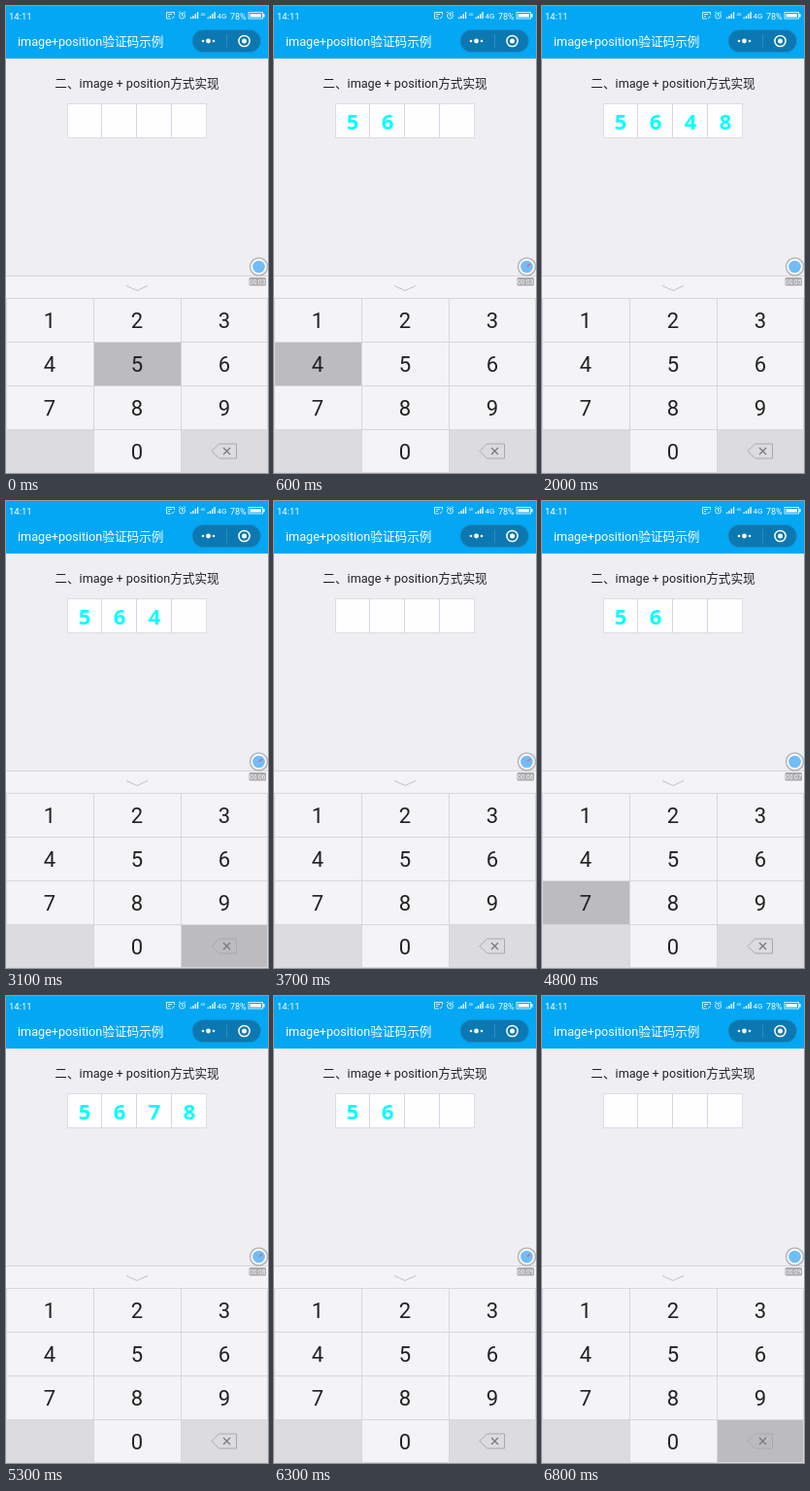
An HTML page for the animation above (7.2 s loop, 270 by 480 pixels).

```html
<!DOCTYPE html>
<html lang="zh-CN">
<head>
<meta charset="utf-8">
<style>
  html, body { margin: 0; width: 100%; height: 100%; overflow: hidden; background: #efeef3; }
  svg { display: block; width: 270px; height: 480px; }
  text { font-family: Roboto, "Noto Sans CJK SC", "Noto Sans CJK", sans-serif; }
  .mid { text-anchor: middle; }
  .line { fill: none; stroke: #d7d6da; }
  .white { fill: none; stroke: #fff; }
  .code { font: 700 22px "Open Sans", "Noto Sans", sans-serif; fill: #0ff; }
</style>
</head>
<body>
<svg viewBox="0 0 270 480">
  <rect width="270" height="480" fill="#efeef3"/>
  <rect width="270" height="54" fill="#03a7f3"/>

  <!-- status bar -->
  <g fill="#fff">
    <text x="3" y="13.5" font-size="9.5">14:11</text>
    <g class="white" stroke-width=".8">
      <path d="M170 13H165.500V6.500H173.500V9M167 8.500h4M167 10.500h2M171 13l2.500-2.500"/>
      <circle cx="181.500" cy="10" r="3"/>
      <path d="M181.500 8v2.200h1.500M178 7l1.500-1.500M185 7l-1.500-1.500"/>
      <rect x="250" y="6.500" width="14.500" height="6.500"/>
    </g>
    <path id="bars" d="M190 11.500h1.300v1.500h-1.300zM192.300 10h1.300v3h-1.300zM194.600 8h1.300v5h-1.300zM196.900 6h1.300v7h-1.300z"/>
    <use href="#bars" x="17.500"/>
    <text x="200.500" y="9.500" font-size="4">4G</text>
    <text x="217.500" y="13" font-size="8">4G</text>
    <text x="231" y="13.500" font-size="9">78%</text>
    <path d="M251.500 8h11.500v3.500h-11.500zM265 8h1.500v3.500h-1.500z"/>
  </g>

  <!-- title bar -->
  <text x="12" y="41" font-size="12.650" fill="#fff">image+position验证码示例</text>
  <rect x="192" y="24.500" width="70.500" height="23" rx="11.500" fill="#0b78b2" stroke="#278fc6" stroke-width=".7"/>
  <path d="M227.500 29v14" stroke="#3b94c4" stroke-width=".7"/>
  <g fill="#fff">
    <circle cx="203" cy="36" r="1.300"/>
    <circle cx="208.500" cy="36" r="2.400"/>
    <circle cx="214" cy="36" r="1.300"/>
    <circle cx="245.500" cy="36" r="2.500"/>
    <circle cx="245.500" cy="36" r="5.600" class="white" stroke-width="1.500"/>
  </g>

  <!-- code boxes -->
  <text class="mid" x="135" y="84" font-size="12.650" fill="#222">二、image + position方式实现</text>
  <rect x="63.500" y="100.500" width="143" height="35" fill="#fefdff" stroke="#dddce0"/>
  <path class="line" d="M98.500 100v36M134.500 100v36M170.500 100v36"/>
  <g id="code"></g>

  <!-- keyboard -->
  <rect y="277" width="270" height="203" fill="#f4f3f6"/>
  <g id="keys"></g>
  <path class="line" d="M0 277.500H270M0 300.500H270M0 345.500H270M0 390.500H270M0 435.500H270M.5 300V480M90.500 300V480M180.500 300V480M269.500 300V480M0 479.500H270"/>
  <path d="M124 287.500l11 5 11-5" fill="none" stroke="#c2c1c5"/>
  <path d="M212 457.500l7.500-7.500h18v15h-18z" fill="none" stroke="#a9a8ab"/>
  <path d="M224 454l7 7m0-7l-7 7" stroke="#777" stroke-width="1.200"/>

  <!-- recorder -->
  <circle cx="260.500" cy="268" r="9" fill="#fafafa" stroke="#b5b5b8" stroke-width="1.500"/>
  <circle cx="260.500" cy="268" r="6.300" fill="#70bdf8"/>
  <path id="tick" d="M261 268l3-3" stroke="#d9667c" stroke-width="1.500"/>
  <rect x="250.500" y="279" width="17.500" height="8.500" rx="1.500" fill="#aaa9ac"/>
  <text id="clock" class="mid" x="259.200" y="286" font-size="6.500" fill="#fff"></text>
</svg>
<script>
const LOOP = 7200, DEL = '<';
// [down, up, time the code changes, key]
const taps = [
  [0, 100, 300, '5'], [400, 500, 500, '6'], [600, 700, 800, '4'], [1000, 1100, 1200, '8'],
  [2800, 3000, 2900, DEL], [3100, 3200, 3200, DEL], [3300, 3400, 3400, DEL], [3600, 3700, 3700, DEL],
  [4300, 4400, 4400, '5'], [4600, 4700, 4700, '6'], [4800, 5000, 5000, '7'], [5100, 5200, 5300, '8'],
  [5900, 6000, 6000, DEL], [6100, 6300, 6200, DEL], [6400, 6600, 6500, DEL], [6700, 7200, 6800, DEL]
];
const $ = id => document.getElementById(id);

function add(parent, tag, attrs, text = '') {
  const el = document.createElementNS('http://www.w3.org/2000/svg', tag);
  for (const name in attrs) el.setAttribute(name, attrs[name]);
  el.textContent = text;
  return parent.appendChild(el);
}

const keys = [...'123456789 0' + DEL].map((key, i) => {
  const x = i % 3 * 90, y = 300 + Math.floor(i / 3) * 45;
  const color = key === ' ' || key === DEL ? '#dcdbde' : '#f4f3f6';
  const rect = add($('keys'), 'rect', { x, y, width: 90, height: 45 });
  if (key !== DEL) {
    add($('keys'), 'text', { class: 'mid', x: x + 45, y: y + 31, 'font-size': 22, fill: '#222' }, key);
  }
  return { key, color, rect };
});
const slots = [81, 117, 153, 189].map(x => add($('code'), 'text', { class: 'mid code', x, y: 126.5 }));

function draw(t) {
  let code = '', pressed = '';
  for (const [down, up, change, key] of taps) {
    if (t >= down && t < up) pressed = key;
    if (t >= change) code = key === DEL ? code.slice(0, -1) : code + key;
  }
  for (const { key, color, rect } of keys) {
    rect.setAttribute('fill', key === pressed ? '#bcbbbe' : color);
  }
  slots.forEach((slot, i) => slot.textContent = code[i] || '');
  $('clock').textContent = '00:0' + Math.min(9, 3 + Math.floor(t / 1000));
  $('tick').style.display = (t + 1900) % 2400 < 1200 ? '' : 'none';
}

const start = performance.now();
function frame() {
  draw((performance.now() - start) % LOOP);
  requestAnimationFrame(frame);
}
frame();
</script>
</body>
</html>
```
